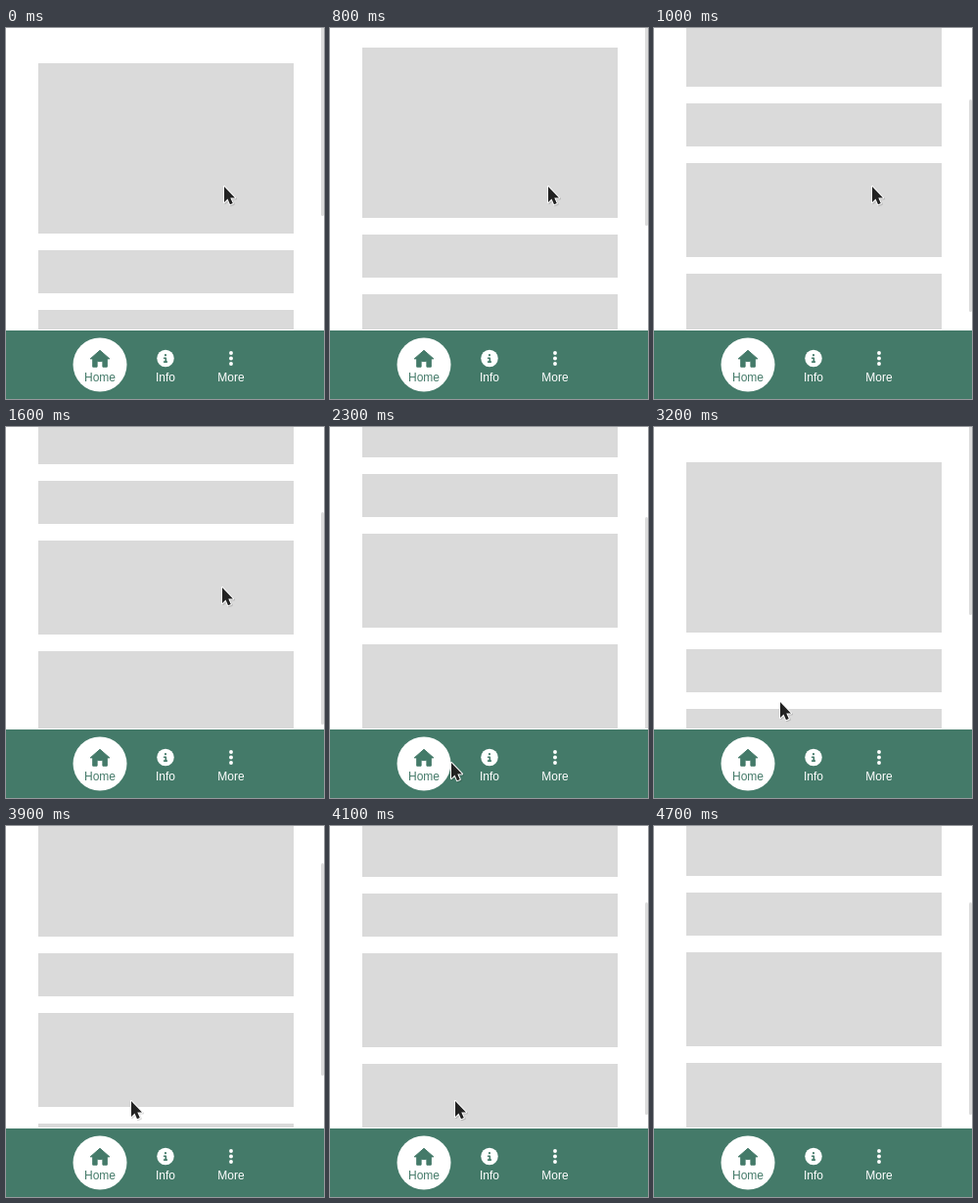
An HTML page that plays this animation: 325 px wide and 379 px high, repeating every 5 s.

```html
<!DOCTYPE html>
<html lang="en">
<head>
<meta charset="utf-8">
<title>Bottom navigation</title>
<style>
  html, body { margin: 0; width: 100%; height: 100%; overflow: hidden; background: #fff; }
  svg { position: absolute; left: 0; top: 0; }
  .label {
    position: absolute; top: 350px; width: 66px; text-align: center; color: #fff;
    font: 12px/14px "Liberation Sans", Arial, sans-serif;
  }
  .home { left: 63px; color: #447a69; }
  .info { left: 130px; }
  .more { left: 197px; }
  .block { fill: #dadada; }
  .green { fill: #447a69; }
  .white { fill: #fff; }
</style>
</head>
<body>
<svg width="325" height="379">
  <g id="page" class="block">
    <rect x="33" y="36" width="261" height="174"/>
    <rect x="33" y="227" width="261" height="44"/>
    <rect x="33" y="288" width="261" height="96"/>
    <rect x="33" y="401" width="261" height="96"/>
  </g>
  <rect id="thumb" x="322" width="3" height="217" rx="1.5" fill="#dcdcdc"/>

  <rect class="white" y="308" width="325" height="2"/>
  <rect class="green" y="309" width="325" height="70"/>
  <circle class="white" cx="96" cy="344" r="27.5"/>
  <path class="green" stroke="#447a69" stroke-linejoin="round"
    d="M96 329.3L105.8 337.9H103.3V346.2H98.9V341.6Q98.9 340.6 97.9 340.6H94.1Q93.1 340.6 93.1 341.6V346.2H88.7V337.9H86.2Z"/>

  <circle class="white" cx="163" cy="337.5" r="8.75"/>
  <circle class="green" cx="163" cy="334.2" r="1.1"/>
  <path d="M161.6 337.2H163.3V341.1M161.6 341.1H164.4" fill="none" stroke="#447a69"
    stroke-width="1.64" stroke-linecap="round" stroke-linejoin="round"/>

  <g class="white">
    <circle cx="230" cy="332" r="1.95"/>
    <circle cx="230" cy="337.5" r="1.95"/>
    <circle cx="230" cy="343" r="1.95"/>
  </g>
</svg>
<div class="label home">Home</div>
<div class="label info">Info</div>
<div class="label more">More</div>
<svg width="325" height="379">
  <g id="cursor" stroke-width="2" stroke-linejoin="round" paint-order="stroke">
    <path d="M1 1V17L4.5 13.5 7 19.2 9.8 18 7.3 12.4H12Z" stroke="#000" opacity=".14"/>
    <path d="M0 0V16L3.5 12.5 6 18.2 8.8 17 6.3 11.4H11Z" fill="#222" stroke="#fff"/>
  </g>
</svg>
<script>
const LOOP = 5000, STEP = 100;

const scrollStart = [0];
const scrollGlides = [
  { from: 725, until: 1018, to: [150] },
  { from: 1300, until: 1770, to: [179] },
  { from: 2600, until: 3205, to: [0] },
  { from: 3585, until: 4148, to: [159] }
];

const cursorStart = [223, 162];
const cursorGlides = [
  { from: 1540, until: 1920, to: [170, 241] },
  { from: 2050, until: 2310, to: [124, 343] },
  { from: 2560, until: 2950, to: [125, 282] },
  { from: 3000, until: 3200, to: [129, 281] },
  { from: 3600, until: 3700, to: [128, 281] },
  { from: 4240, until: 4720, to: [172, -40] }
];

const page = document.getElementById("page");
const thumb = document.getElementById("thumb");
const cursor = document.getElementById("cursor");

const clamp = t => Math.min(1, Math.max(0, t));
const ease = t => t ** 3 * (10 - 15 * t + 6 * t * t);

// Applies each glide in turn, each one starting where the last one ends.
function follow(start, glides, time) {
  return glides.reduce((now, { from, until, to }) => {
    const part = ease(clamp((time - from) / (until - from)));
    return now.map((v, i) => v + (to[i] - v) * part);
  }, start).map(Math.round);
}

function draw() {
  const time = Math.floor(performance.now() % LOOP / STEP) * STEP;
  const [scroll] = follow(scrollStart, scrollGlides, time);
  page.setAttribute("transform", `translate(0 ${-scroll})`);
  thumb.setAttribute("y", Math.floor(scroll * 0.6532 - 24.9));
  cursor.setAttribute("transform", `translate(${follow(cursorStart, cursorGlides, time)})`);
  requestAnimationFrame(draw);
}
draw();
</script>
</body>
</html>
```
